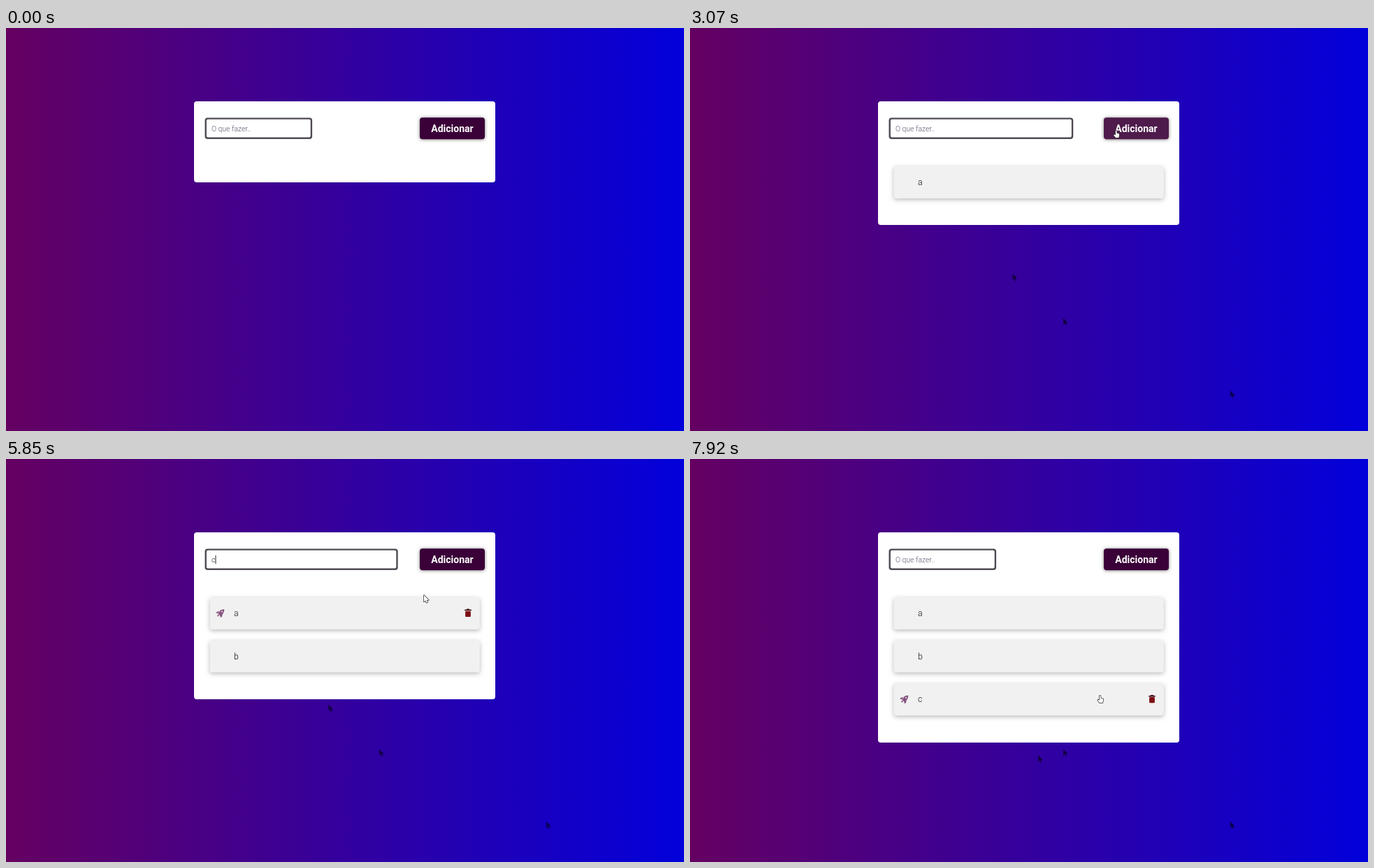
Recreate the animation shown at these times as an HTML page with a canvas. Size 970 px wide and 577 px high, loop 8 s.

```html
<!DOCTYPE html>
<html lang="pt">
<head>
<meta charset="utf-8">
<title>Lista de tarefas</title>
<style>
html, body { margin: 0; width: 100%; height: 100%; overflow: hidden; background: #30a; }
canvas { display: block; width: 970px; height: 577px; }
</style>
</head>
<body>
<canvas id="stage" width="970" height="577"></canvas>
<script>
const ctx = document.getElementById('stage').getContext('2d');
const LOOP = 8000, GROW = 500, FADE = 120;
const PITCH = 61.6;
const SWEEP_START = 130, SWEEP_END = 1050;

// Times of focus, typing and adding; aside is where the pointer rests after typing
const tasks = [
  { text: 'a', focus: 1680, type: 2300, add: 3018, aside: [452, 175] },
  { text: 'b', focus: 3850, type: 4200, add: 4638, aside: [429, 167] },
  { text: 'c', focus: 5390, type: 5650, add: 6343, aside: [598, 195] }
];

const stops = planStops();
const markTimes = [SWEEP_START, 516, 691, 860, 7050];

const clamp = v => Math.max(0, Math.min(1, v));
const smooth = k => k * k * (3 - 2 * k);
const bezier = (a, b, c, d, u) =>
  a * (1 - u) ** 3 + 3 * b * u * (1 - u) ** 2 + 3 * c * u * u * (1 - u) + d * u ** 3;

// cubic-bezier(.25, .1, .25, 1)
function ease(x) {
  x = clamp(x);
  let lo = 0, hi = 1;
  for (let i = 0; i < 20; i++) {
    const mid = (lo + hi) / 2;
    if (bezier(0, 0.25, 0.25, 1, mid) < x) lo = mid; else hi = mid;
  }
  return bezier(0, 0.1, 1, 1, lo);
}

// Every task goes field, aside, button; then the pointer visits the last item
function planStops() {
  const list = [];
  let spot = [356, 144];
  const stay = (from, to, place) => {
    list.push({ t: from, at: place }, { t: to, at: place });
    spot = place;
  };
  tasks.forEach(({ focus, type, add, aside }, i) => {
    list.push({ t: focus - 300, at: spot });
    stay(focus - 60, type, i ? [420, 148] : spot);
    stay(type + 90, type + 220, aside);
    stay(add - 60, add + 140, [609 + 24 * i, 147]);
  });
  stay(6990, 7050, [498, 424]);
  stay(7120, 7320, [522, 424]);
  stay(7700, LOOP, [586, 339]);
  return list;
}

function pointerAt(t) {
  if (t < SWEEP_START) return null;
  if (t < SWEEP_END) {
    const u = (t - SWEEP_START) / (SWEEP_END - SWEEP_START);
    return [bezier(773, 530, 430, 356, u), bezier(519, 440, 380, 144, u)];
  }
  const i = stops.findIndex(stop => stop.t > t);
  if (i <= 0) return stops[0].at;
  const a = stops[i - 1], b = stops[i];
  const k = smooth((t - a.t) / (b.t - a.t));
  return a.at.map((v, axis) => v + (b.at[axis] - v) * k);
}

const countAt = t => tasks.filter(task => t >= task.add).length;

function inputWidth(t) {
  let open = 0;
  for (const { focus, add } of tasks) {
    if (t >= focus) open = t < add ? ease((t - focus) / GROW) : 1 - ease((t - add) / GROW);
  }
  return 153.6 + 123 * open;
}

// Name of the control under the pointer
function targetAt(t) {
  const p = pointerAt(t);
  if (!p) return '';
  const [x, y] = p;
  if (y >= 128 && y <= 159) {
    if (x >= 592 && x <= 685) return 'button';
    if (x >= 284 && x <= 284 + inputWidth(t)) return 'input';
  }
  const row = Math.floor((y - 194) / PITCH);
  const onRow = row >= 0 && row < countAt(t) && (y - 194) % PITCH <= 50;
  return onRow && x >= 291 && x <= 678 ? 'item' + row : '';
}

// Hover amount is the share of the recent past spent on the control
function hover(name, t) {
  const samples = 12;
  let hits = 0;
  for (let i = 0; i < samples; i++) if (targetAt(t - FADE * i / samples) === name) hits++;
  return hits / samples;
}

function box(x, y, w, h, r, fill) {
  ctx.fillStyle = fill;
  ctx.beginPath();
  ctx.roundRect(x, y, w, h, r);
  ctx.fill();
}

function shadowBox(x, y, w, h, fill, shade, blur, dy) {
  ctx.save();
  ctx.shadowColor = shade;
  ctx.shadowBlur = blur;
  ctx.shadowOffsetY = dy;
  box(x, y, w, h, 4, fill);
  ctx.restore();
}

function label(text, x, y, font, fill) {
  ctx.font = font + ' Roboto, sans-serif';
  ctx.fillStyle = fill;
  ctx.fillText(text, x, y);
}

const arrow = new Path2D('M0 0V9.5L2.2 7.6 3.6 10.8 5.2 10 3.9 7H6.8Z');
const hand = new Path2D('M0 0H1.4L1.7 3.7 5 4.5V7L4.2 10H0L-2.8 6.4-2 5.4-.2 6.5Z');
const beam = new Path2D('M-2.5-4h5v1H.7v6H2.5v1h-5v-1H-.7v-6H-2.5Z');

function drawPointer(t) {
  const p = pointerAt(t);
  if (!p) return;
  const target = targetAt(t);
  ctx.save();
  ctx.translate(...p);
  ctx.lineJoin = 'round';
  ctx.lineWidth = 1.5;
  ctx.strokeStyle = ctx.fillStyle = '#333';
  if (target === 'input') {
    ctx.fill(beam);
  } else {
    const onItem = target.startsWith('item') && p[1] >= 198;
    const shape = target === 'button' || onItem ? hand : arrow;
    ctx.stroke(shape);
    ctx.fillStyle = '#fff';
    ctx.fill(shape);
  }
  ctx.restore();
}

// Dark prints the pointer leaves on the backdrop
function drawMarks(t) {
  ctx.fillStyle = 'rgba(5,0,20,.65)';
  for (const time of markTimes) {
    if (t < time) continue;
    ctx.save();
    ctx.translate(...pointerAt(time));
    ctx.fill(arrow);
    ctx.restore();
  }
}

const rocket = new Path2D(
  'M0-7.5Q4.6-3 2.4 3.2H-2.4Q-4.6-3 0-7.5Z' +
  'M2.6-1.5L5 2 4.6 5 2 2.5ZM-2.6-1.5L-5 2-4.6 5-2 2.5ZM-1.5 4h3L0 7Z');

function drawRocket(x, y) {
  ctx.save();
  ctx.translate(x, y);
  ctx.rotate(Math.PI / 4);
  ctx.fillStyle = '#85527f';
  ctx.fill(rocket);
  box(-1, -3.8, 2, 2, 1, '#f1f1f1');
  ctx.restore();
}

function drawTrash(x, y) {
  box(x - 1.8, y - 6, 3.6, 1.5, 0.5, '#40080c');
  box(x - 4.8, y - 5, 9.6, 1.8, 0.5, '#40080c');
  box(x - 3.9, y - 2.6, 7.8, 8.2, 1, '#7d0e14');
}

function drawItem(i, t) {
  const top = 198 + i * PITCH, mid = top + 22.5;
  shadowBox(291.6, top, 386.2, 46, '#f1f1f1', 'rgba(0,0,0,.27)', 6, 2);
  label(tasks[i].text, 326, mid + 4.6, '300 12.3px', '#111');
  ctx.globalAlpha = hover('item' + i, t);
  drawRocket(307, mid);
  drawTrash(661, mid);
  ctx.globalAlpha = 1;
}

function drawInput(t) {
  const left = 284.5, top = 128.4, edge = 2.4, width = inputWidth(t), height = 30.6;
  box(left, top, width, height, 4, '#504a53');
  box(left + edge, top + edge, width - 2 * edge, height - 2 * edge, 2, '#fff');
  const task = tasks.find(k => t >= k.focus && t < k.add);
  const typed = task && t >= task.type;
  label(typed ? task.text : 'O que fazer..', 294, 147.5, '300 10.4px', typed ? '#222' : '#5d5670');
  if (task && (t - (typed ? task.type : task.focus)) % 1060 < 530) {
    ctx.fillStyle = '#222';
    ctx.fillRect(typed ? 299.5 : 294, 138, 1, 12);
  }
}

function drawButton(t) {
  const h = hover('button', t);
  const fill = `rgb(${58 + 20 * h},${27 * h},${56 + 20 * h})`;
  shadowBox(592, 128.2, 93, 31, fill, 'rgba(0,0,0,.5)', 5, 0.5);
  label('Adicionar', 608.2, 149.2, 'bold 14px', '#fff');
}

const backdrop = ctx.createLinearGradient(0, 0, 970, 0);
backdrop.addColorStop(0, 'rgb(101,0,97)');
backdrop.addColorStop(1, 'rgb(2,0,219)');

function draw(t) {
  ctx.fillStyle = backdrop;
  ctx.fillRect(0, 0, 970, 577);
  drawMarks(t);
  const count = countAt(t);
  box(269, 105, 431, Math.round(115.8 + count * PITCH), 4, '#fff');
  for (let i = 0; i < count; i++) drawItem(i, t);
  drawInput(t);
  drawButton(t);
  drawPointer(t);
}

const start = performance.now();
function tick() {
  draw((performance.now() - start) % LOOP);
  requestAnimationFrame(tick);
}
tick();
</script>
</body>
</html>
```
